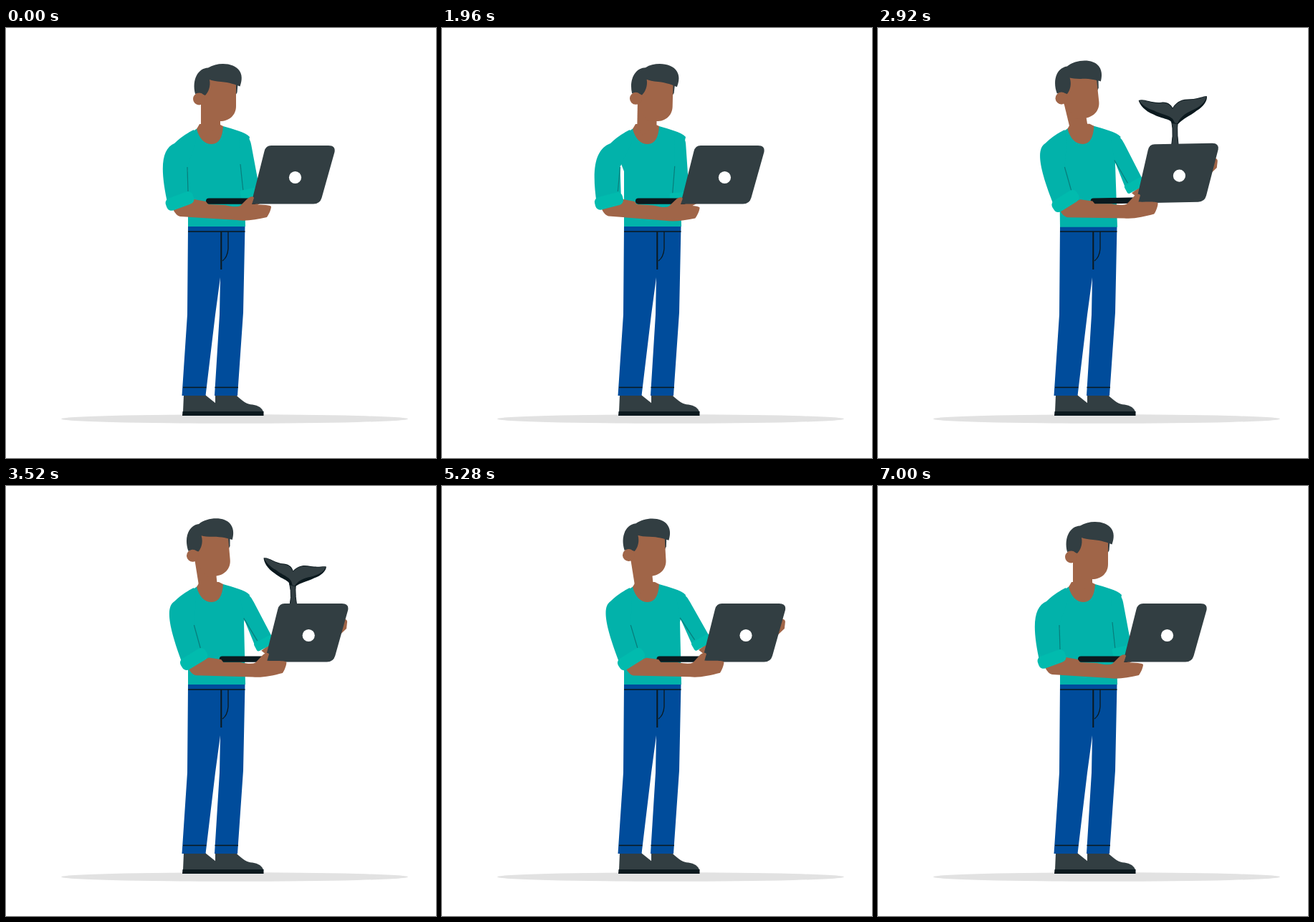
Animation, 600 px wide and 600 px high, one loop 7040 ms. Source, as an HTML page:

```html
<!DOCTYPE html>
<html lang="en">
<head>
<meta charset="utf-8">
<title>Man with laptop</title>
<style>
  html, body { margin: 0; width: 100%; height: 100%; overflow: hidden; background: #fff; }
  svg { display: block; width: 100vw; height: 100vh; }
  .skin { fill: #a06548; }
  .shirt { fill: #02b2aa; }
  .cuff { fill: #01bbae; }
  .dark { fill: #323e42; }
  .ink { fill: #0b191e; }
  .jeans { fill: #004c9b; }
  .fold { fill: none; stroke: #087d7b; stroke-width: 1.2; }
  .seam { fill: none; stroke: #0b191e; stroke-width: 1.3; }
</style>
</head>
<body>
<svg viewBox="0 0 600 600">
  <ellipse cx="319" cy="545.5" rx="242" ry="6.3" fill="#e2e2e2"/>

  <!-- shoes and trousers -->
  <path class="dark" d="M248 512H278L293 524V536H247Z"/>
  <path class="dark" d="M292 512H321C330 521 336 525 344 525.500Q356 527 359.500 536H292Z"/>
  <path class="ink" d="M246.500 535H359.500V541H246Z"/>
  <path class="jeans" d="M254 276H333.500L331 397L323 513H291L298 400L299 348L292 400L278.500 513H245.500L253 400Z"/>
  <path class="seam" d="M254 284H333.500M247 501.500H279.500M291.500 501.500H324M310 284V308Q309 320 302 325"/>
  <path class="ink" d="M299.300 284H301.300V337H299.300Z"/>

  <g id="dots" class="skin"><circle r="2"/><circle r="2.200"/><circle r="2.200"/></g>

  <g id="torso">
    <path class="shirt" d="M267 140C258 146 246 153 238 159L254 200V277H334L332 190L340 152C334 145 316 141 303 137Z"/>
    <path class="skin" d="M266 141C270 155 277 162 287 162C297 162 302 153 303 137L297 134H270Z"/>
  </g>
  <path id="neck" class="skin"/>
  <g id="head">
    <path class="dark" d="M319 76L323.500 78L322.500 90L319 96Z"/>
    <path class="skin" d="M272 107V92L282 70L321 74V109C321 122 311 130 299 130H286Z"/>
    <path class="dark" d="M264 92C259 72 268 56 282 55.500C295 47 319 48 326 60C331 68 328 77 326.500 81.500C320 79 312 76 300 75Q289 74 284 72C286 82 282 90 278 94L270 91Z"/>
    <circle class="skin" cx="269.500" cy="99" r="8.500"/>
  </g>

  <path id="farArm" class="skin" d="M-4 11L12-1L50-5L6 19Z"/>
  <path id="farSleeve" class="shirt"/>
  <path id="farFold" class="fold"/>
  <rect id="farCuff" class="cuff" x="-14" y="-6" width="28" height="13" rx="3"/>
  <path id="farHand" class="skin" d="M462 186C470 183 477 184 476.500 189L475.500 198L466 207Z"/>

  <g id="tail">
    <path id="stem" class="dark" stroke="#0b191e"/>
    <g id="flukes">
      <path class="ink" d="M-56-25C-48-29-38-22-22-25C-13-27-7-22-5-18C1-29 8-32 20-33C34-35 38-39 44-39.500C46-33 40-23 31-17C20-7 12-4 5 5H-4C-6-2-18 0-32-6C-46-10-54-19-56-25Z"/>
      <path class="dark" d="M-55-24.500C-47-28-38-21-22-24C-13-26-8-21-5-16.500C1-28 8-31 20-32C34-34 38-38 43-38.500C44-33 38-25 28-19C18-13 9-9 4 4H0C-4-8-18-6-32-12C-42-14-52-20-55-24.500Z"/>
    </g>
  </g>

  <g id="laptop">
    <rect class="ink" x="279" y="237.500" width="72" height="8.200" rx="4.100"/>
    <path class="dark" d="M370 164H450Q460 164 458.500 173L440.500 237Q438 245.500 429 245.500H342L360.500 172Q362.500 164 370 164Z"/>
    <circle cx="403.500" cy="208.500" r="8.600" fill="#fff"/>
  </g>

  <path id="arm" class="skin" d="M232 250C234 256 238 262 243 263L322 268C335 270 350 267 364 264C367 260 370 253 370 249C367 246 352 247 343 246L346 237C345 234 340 235 336 239L327 248Q322 251 305 247L282 246L279 242L262 239Z"/>
  <path id="sleeve" class="shirt"/>
  <path id="fold" class="fold"/>
  <rect id="cuff" class="cuff" x="-20" y="-9" width="40" height="18" rx="7"/>
</svg>
<script>
const LOOP = 7040, NOTICE = 2140, AWAY = 2400;
const $ = id => document.getElementById(id);

const ease = (t, from, to) => {
  const p = Math.max(0, Math.min(1, (t - from) / (to - from)));
  return p * p * (3 - 2 * p);
};
const move = (id, x, y, turn = 0, cx = 0, cy = 0) =>
  $(id).setAttribute('transform', `translate(${x} ${y}) rotate(${turn} ${cx} ${cy})`);
const shape = (id, d) => $(id).setAttribute('d', d);
const show = (id, on) => $(id).setAttribute('visibility', on ? 'visible' : 'hidden');

// Sets a cuff and returns its two ends, where the sleeve joins it.
function setCuff(id, x, y, turn, half) {
  move(id, x, y, turn);
  const a = turn * Math.PI / 180, dx = half * Math.cos(a), dy = half * Math.sin(a);
  return [`${x - dx} ${y - dy}`, `${x + dx} ${y + dy}`];
}

function drawNearArm(shift, lean, startle) {
  const k = -5 * startle;
  const [outer, inner] = setCuff('cuff', 242.5 + 1.05 * shift, 241.5, -20 - 11 * lean - 4 * startle, 17.5);
  const pit = `${253 + .5 * shift + k} 194`;
  shape('sleeve', `M${262 + k} 142Q${246 + k} 150 ${235 + k} 161`
    + `C${217 + .3 * shift + k} 169 ${214 + .65 * shift + k} 195 ${outer}L${inner}L${pit}L${265 + k} 160Z`);
  shape('fold', `M${pit}L${254 + .95 * shift + .7 * k} 228`);
  move('arm', 1.16 * shift, 1.5 * lean, -2 * lean - 2 * startle, 236, 256);
}

function drawFarArm(shift, startle) {
  const k = -5 * startle, x = 341 + 1.03 * shift + k, y = 230 - .6 * shift;
  const [inner, outer] = setCuff('farCuff', x, y, -12 - .86 * shift - 4 * startle, 13.5);
  const pit = `${327 + .25 * shift + k} ${190 - .3 * shift}`;
  shape('farSleeve', `M${325 + k} 145Q${339 + k} 148 ${342 + .2 * shift + k} 162L${outer}L${inner}L${pit}Z`);
  shape('farFold', `M${pit}L${331 + 1.05 * shift + k} ${228 - .65 * shift}`);
  move('farArm', x, y);
  move('farHand', 1.6 * (shift - 19) - 4 * startle, 1 - 12 * startle);
}

function drawHead(x, y, turn) {
  move('head', x, y, turn, 296, 100);
  shape('neck', `M${272 + x} ${105 + y}L${272 + .36 * x} 137L${280 + .3 * x} 150`
    + `L${299 + .5 * x} 135L${299 + .7 * x} ${122 + y}Z`);
}

// The tail shoots up tilted, then sways until it dives.
function drawTail(t, startle) {
  const rise = ease(t, 2180, 2360) - ease(t, 4620, 4920);
  const sway = (1 - startle) * Math.sin((t - 3280) / 1200 * 2 * Math.PI);
  const x = 408 - 8 * sway + 4 * startle, base = 410 - 10 * sway - 7 * startle;
  const y = 215 - rise * (91 - 12 * sway * sway);
  const size = (1 - .14 * sway * sway) * (.4 + .6 * rise);
  show('tail', rise > 0);
  shape('stem', `M${base - 7} 174Q${base} ${y + 22} ${x - 5} ${y}H${x + 4}Q${base + 2} ${y + 20} ${base + 7} 174Z`);
  $('flukes').setAttribute('transform',
    `translate(${x} ${y}) rotate(${17 * sway + 46 * startle}) scale(${size})`);
}

function drawDots(t) {
  const p = (t - 2240) / 400;
  show('dots', p > 0 && p < 1);
  [...$('dots').children].forEach((dot, i) => {
    const side = i - 1;
    dot.setAttribute('cx', 262 + side * 11 * (.6 + .8 * p));
    dot.setAttribute('cy', 39.5 + 3.5 * Math.abs(side) - 22 * p);
    dot.setAttribute('opacity', Math.min(1, 4 * Math.max(0, 1 - p)));
  });
}

function draw(t) {
  const jump = ease(t, NOTICE, AWAY);
  const startle = jump - ease(t, 2480, 3200);
  const away = jump - ease(t, 6080, 6860);
  const push = t / 216 * (1 - jump);
  const hold = (t - AWAY) / 1000 * away;
  const shift = 17.6 * away + hold - push;
  const lean = shift / 18.5;

  $('torso').setAttribute('transform', `translate(0 ${277 + 2 * startle})`
    + `skewX(${2 * startle}) scale(1 ${1 + .02 * startle}) translate(0 -277)`);
  drawHead(-9 * away - 13.5 * startle + .1 * push, -4 * away + .5 * startle,
    hold - 6.1 * away - 1.5 * startle + .16 * push);
  drawNearArm(shift, lean, startle);
  drawFarArm(shift, startle);
  move('laptop', shift - 3.6 * startle, -7 * startle, -3.5 * startle, 403.5, 208.5);
  drawTail(t, startle);
  drawDots(t);
}

const start = performance.now();
function tick() {
  draw((performance.now() - start) % LOOP);
  requestAnimationFrame(tick);
}
tick();
</script>
</body>
</html>
```
